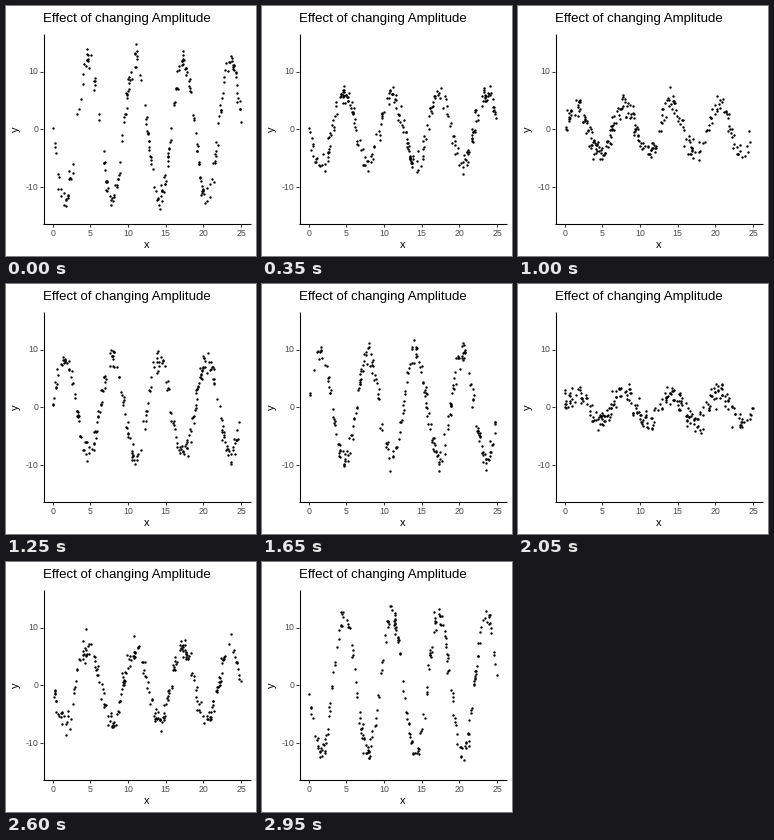
Write a matplotlib script that moves like this. It is 250 px wide and 250 px high and loops after 3 s.

```python
import numpy as np
import matplotlib.pyplot as plt
from matplotlib.animation import FuncAnimation

SIZE, DPI = 250, 72
FRAMES, INTERVAL = 60, 50
POINTS, PEAK = 250, 12

plt.rcParams["font.family"] = "Liberation Sans"
fig = plt.figure(figsize=(SIZE / DPI, SIZE / DPI), dpi=DPI, facecolor="white")
ax = fig.add_axes([0, 0, 1, 1])
ax.set(xlim=(0, SIZE), ylim=(SIZE, 0))
ax.axis("off")

LEFT, RIGHT, TOP, BOTTOM = 37.5, 244.5, 28, 217.5


def px(x):
    return 46.6 + 7.54 * x


def py(y):
    return 123 - 5.75 * y


def line(xs, ys, color="black"):
    ax.plot(xs, ys, color=color, lw=1.07, solid_capstyle="butt")


def label(x, y, s, size, color="black", ha="center", **kw):
    ax.text(x, y, s, fontsize=size, color=color, ha=ha, va="baseline", **kw)


label(37, 16, "Effect of changing Amplitude", 13.2, ha="left")
label(141, 242, "x", 11)
ax.text(9.5, 123, "y", fontsize=11, rotation=90, ha="center", va="center")

line([LEFT, LEFT], [TOP, BOTTOM + 0.5])
line([LEFT - 0.5, RIGHT], [BOTTOM, BOTTOM])
for v in range(0, 26, 5):
    line([px(v)] * 2, [BOTTOM + 0.5, BOTTOM + 3.3], "#333333")
    label(px(v), 230, str(v), 8.8, "#4d4d4d")
for v in (-10, 0, 10):
    line([LEFT - 3.3, LEFT - 0.5], [py(v)] * 2, "#333333")
    label(32.5, py(v) + 3, str(v), 8.8, "#4d4d4d", ha="right")

dots, = ax.plot([], [], "o", color="black", ms=2.4, mew=0)


def amplitude(i):
    """Linear sweep from -PEAK up to PEAK and back."""
    half = (FRAMES - 1) / 2
    return PEAK * (1 - 2 * abs(i - half) / half)


def update(i):
    rng = np.random.default_rng(100 + i)
    x = rng.uniform(0, 25, POINTS)
    y = amplitude(i) * np.sin(x) + rng.normal(0, 1, POINTS)
    dots.set_data(px(x), py(np.clip(y, -15, 15)))
    return dots,


anim = FuncAnimation(fig, update, frames=FRAMES, interval=INTERVAL,
                     repeat=True, repeat_delay=0)
plt.show()
```
